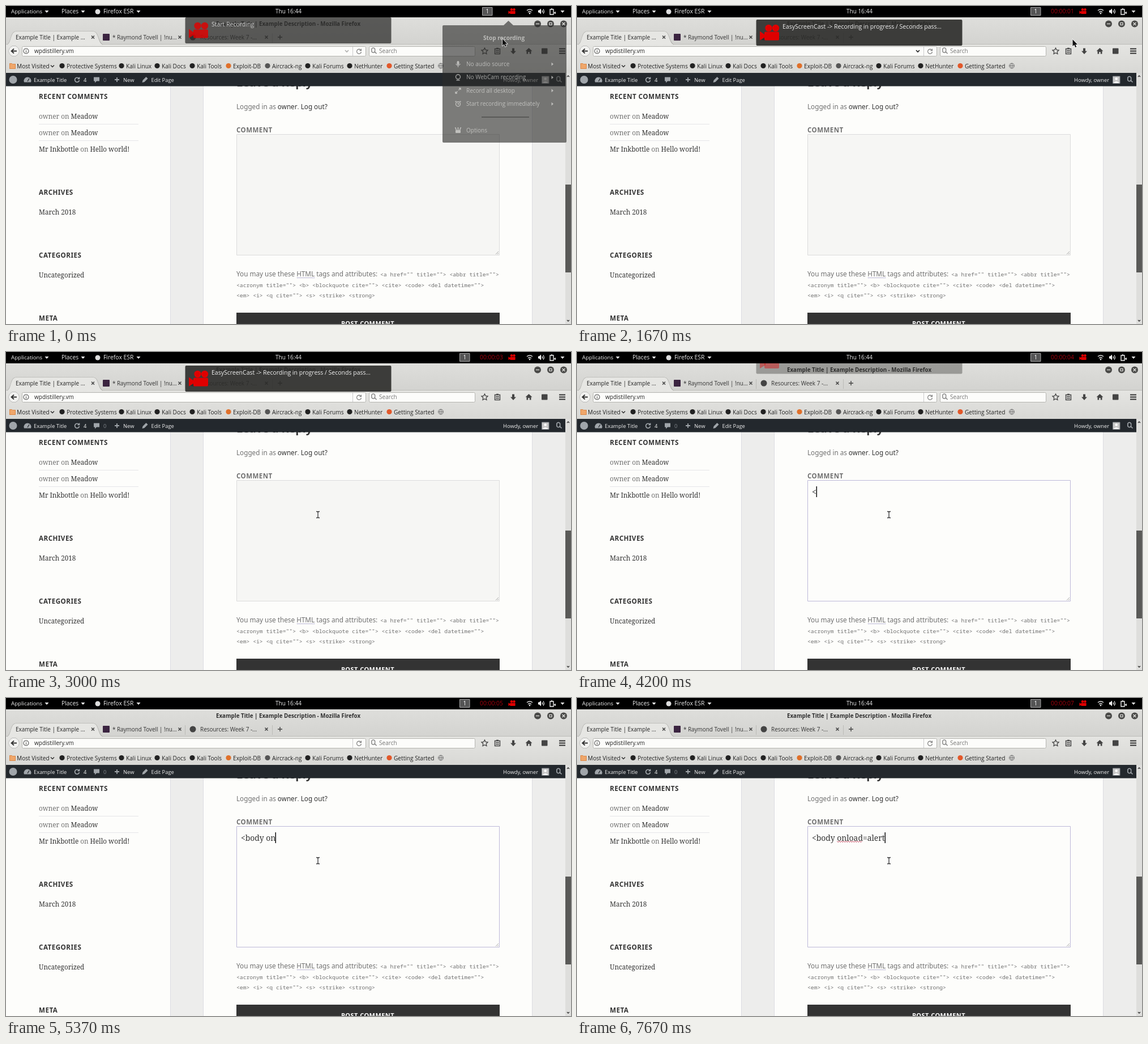
Recreate the animation shown at these times as an HTML page with a canvas. Size 998x561 px, loop 8000 ms.

```html
<!DOCTYPE html>
<html lang="en">
<head>
<meta charset="utf-8">
<title>Screen recording</title>
<style>
html, body { margin: 0; width: 100%; height: 100%; overflow: hidden; background: #000; }
canvas { display: block; }
</style>
</head>
<body>
<canvas id="stage" width="998" height="561"></canvas>
<script>
const ctx = document.getElementById('stage').getContext('2d');
const LOOP = 8000;
const UI = '"Open Sans", sans-serif', SANS = '"Noto Sans", sans-serif';
const SERIF = '"Noto Serif", serif', MONO = '"Noto Sans Mono", monospace';
const INK = '#333', GREY = '#707070', PAGE = '#fdfdfb', RED = '#e00000';
const clamp = v => Math.max(0, Math.min(1, v));

// ---- drawing helpers ----
function text(s, x, y, size, color, family = UI, weight = 400, spacing = 0) {
  ctx.font = `${weight} ${size}px ${family}`;
  ctx.letterSpacing = spacing + 'px';
  ctx.fillStyle = color;
  ctx.fillText(s, x, y);
  return x + ctx.measureText(s).width;
}
function runs(x, y, size, family, ...parts) {
  for (const [s, color] of parts) x = text(s, x, y, size, color, family);
}
function rect(x, y, w, h, fill, r = 0, stroke) {
  ctx.beginPath();
  ctx.roundRect(x, y, w, h, r);
  ctx.fillStyle = fill;
  ctx.fill();
  if (stroke) { ctx.strokeStyle = stroke; ctx.lineWidth = 1; ctx.stroke(); }
}
function disc(x, y, r, fill) {
  ctx.beginPath();
  ctx.arc(x, y, r, 0, 7);
  ctx.fillStyle = fill;
  ctx.fill();
}
function path(d, x, y, { fill, stroke, width = 1.2, scale = 1 }) {
  const p = new Path2D(d);
  ctx.save();
  ctx.translate(x, y);
  ctx.scale(scale, scale);
  if (stroke) { ctx.strokeStyle = stroke; ctx.lineWidth = width; ctx.stroke(p); }
  if (fill) { ctx.fillStyle = fill; ctx.fill(p); }
  ctx.restore();
}
const line = (d, x, y, stroke, width) => path(d, x, y, { stroke, width });
const solid = (d, x, y, fill) => path(d, x, y, { fill });
const gradient = (y0, y1, a, b) => {
  const g = ctx.createLinearGradient(0, y0, 0, y1);
  g.addColorStop(0, a);
  g.addColorStop(1, b);
  return g;
};

// ---- icon paths, centred on 0,0 ----
const DOWN = 'M-3.5-2H3.5L0 2Z', RIGHT = 'M-1.5-3L2 0L-1.5 3Z', CROSS = 'M-2.5-2.5L2.5 2.5M2.5-2.5L-2.5 2.5';
const RELOAD = 'M3-2.5A4 4 0 1 0 4 1M4-4.5V-1.5H1', PLUS = 'M-4 0H4M0-4V4', CHEVRON = 'M-3-1.5L0 1.5L3-1.5';
const LENS = 'M1.5-1.5A3 3 0 1 0-4-1.5A3 3 0 1 0 1.5-1.5M1 1L4.5 4.5';
const CAMERA = 'M-9-7a6 6 0 1 0 .1 0ZM8-2a6 6 0 1 0 .1 0Z';

function camera(x, y, scale) {
  ctx.save();
  ctx.translate(x, y);
  ctx.scale(scale, scale);
  disc(-1.5, -7.5, 6.2, RED);
  disc(11, -7.5, 6.2, RED);
  rect(-9, -1, 26, 15, RED, 2);
  solid('M-17-2L-7 5V8L-17 14Z', 0, 0, RED);
  ctx.restore();
}

// ---- desktop and browser ----
function topBar(t) {
  const count = Math.floor(t / 1000);
  rect(0, 0, 998, 20, '#000');
  text('Applications', 9, 13, 9.7, '#eee');
  text('Places', 98, 13, 10.3, '#eee');
  text('Firefox ESR', 172, 13, 10.4, '#eee');
  text('Thu 16:44', 476, 13, 10, '#eee');
  for (const x of [72, 136, 234]) solid(DOWN, x, 10, '#eee');
  disc(162, 10, 4.5, '#ddd');
  const box = count ? 801.5 : 841.5;
  rect(box, 2.5, 17.5, 14, '#555', 0, '#aaa');
  text('1', box + 6, 13, 10, '#fff');
  if (count) text('00:00:0' + count, 837, 13, 10.3, '#a8000c');
  camera(893.5, 9, .36);
  line('M-5-2Q0-6 5-2M-3 1Q0-2 3 1', 925, 10, '#ddd', 1.4);
  disc(925, 13, 1.4, '#ddd');
  solid('M-6-2H-4L-1-5V5L-4 2H-6Z', 946, 9.5, '#fff');
  line('M1-2Q2 0 1 2M3-4Q5.5 0 3 4', 946, 9.5, '#fff');
  line('M-4-4H2V5H-4ZM-2-5H0M3 2H6M5 0V4', 965, 10, '#eee', 1.4);
  solid(DOWN, 983, 10, '#eee');
}

const bookmarks = [
  ['Most Visited', 19], ['Protective Systems', 107, '#222'], ['Kali Linux', 212, '#222'],
  ['Kali Docs', 275, '#222'], ['Kali Tools', 337, '#222'], ['Exploit-DB', 401, '#e0702a'],
  ['Aircrack-ng', 470, '#555'], ['Kali Forums', 541, '#222'], ['NetHunter', 615, '#222'],
  ['Getting Started', 685, '#e2582a']
];

function browser(t) {
  rect(0, 20, 998, 48, gradient(20, 68, '#dededb', '#d3d3d0'));
  rect(0, 67, 998, 51, gradient(67, 118, '#e5e5e2', '#d8d8d5'));
  text('Example Title | Example Description - Mozilla Firefox', 371, 35, 9.75, '#2e2e2e', UI, 700);
  for (const [x, d] of [[939, 'M-3 0H3'], [962, 'M-2-2H2V2H-2Z'], [985, CROSS]]) {
    disc(x, 31.5, 6, '#4b4b49');
    line(d, x, 31.5, '#e5e5e2', 1.2);
  }

  // Tabs
  line('M0 67.5H998', 0, 0, '#bcbcb8', 1);
  path('M2 68C10 66 7 45 18 45H154C164 45 162 66 171 68', 0, 0, { fill: '#e6e6e3', stroke: '#aaaaa6' });
  line('M316.5 48V65M470.5 48V65', 0, 0, '#bbbbb7', 1);
  text('Example Title | Example ...', 17, 58.5, 9.95, '#222');
  rect(171, 49, 12, 12, '#3b2440', 1);
  text('* Raymond Tovell | !nu...', 188, 58.5, 9.9, '#333');
  disc(330, 55, 5.5, '#444');
  text('Resources: Week 7 -...', 343, 58.5, 9.95, '#333');
  for (const x of [153.5, 307, 460]) line(CROSS, x, 55, '#444', 1.5);
  line(PLUS, 484, 55, '#444', 1.4);

  // Address and search
  rect(28.5, 71.5, 607, 17, '#fcfcfa', 2, '#b4b4b0');
  rect(641.5, 71.5, 187, 17, '#fcfcfa', 2, '#b4b4b0');
  path('M9 0A9 9 0 1 0-9 0A9 9 0 1 0 9 0', 14, 79.5, { fill: '#f2f2f0', stroke: '#999', width: 1 });
  line('M5 0H-4M0-4L-4.5 0L0 4', 14, 79.5, '#333', 1.8);
  line('M4.5 0A4.5 4.5 0 1 0-4.5 0A4.5 4.5 0 1 0 4.5 0M0-2.5V-1.3M0-.5V2.7', 35.5, 79.5, '#555', 1.1);
  text('wpdistillery.vm', 50, 83, 10, '#222');
  ctx.globalAlpha = t < 1700 ? clamp(.35 + t / 250) : clamp(1 - (t - 1850) / 150);
  line(CHEVRON, 602, 79.5, '#222', 1.7);
  ctx.globalAlpha = 1;
  line('M612.5 72V88', 0, 0, '#ccc', 1);
  line(RELOAD, 623.5, 80, '#888', 1.3);
  line(LENS, 650, 79.5, '#777', 1.3);
  text('Search', 659, 83, 10.1, '#777');

  // Toolbar icons
  line('M0-5.5L1.7-2L5.5-1.5L2.7 1.2L3.4 5L0 3.2L-3.4 5L-2.7 1.2L-5.5-1.5L-1.7-2Z', 845.5, 79.5, '#444', 1.3);
  line('M-4.5-4H4.5V5H-4.5ZM-2-5H2M-3-1H3M-3 2H3', 868, 79.5, '#444', 1.4);
  solid('M-2-5H2V0H5L0 5.5L-5 0H-2Z', 896, 79.5, '#444');
  solid('M0-5.5L6 0H4V5H1.3V1.5H-1.3V5H-4V0H-6Z', 923.5, 79.5, '#444');
  rect(946, 74.5, 10.5, 10, '#444', 1);
  line('M-5.5-4H5.5M-5.5 0H5.5M-5.5 4H5.5', 982.5, 79.5, '#333', 1.8);

  // Bookmarks
  for (const [name, x, color] of bookmarks) {
    text(name, x, 109.5, 10.15, '#222');
    if (color) disc(x - 8, 105.5, 4.6, color);
  }
  path('M-5-4H-1L0-3H5V5H-5Z', 11.5, 105.5, { fill: '#efa66a', stroke: '#c86a25', width: 1 });
  line(CHEVRON, 82, 106, '#333', 1.5);
  line('M4.5 0A4.5 4.5 0 1 0-4.5 0A4.5 4.5 0 1 0 4.5 0M-4.5 0H4.5M0-4.5Q-4 0 0 4.5Q4 0 0-4.5', 768, 105.5, '#777', 1);
}

// ---- web page ----
function heading(s, y) { text(s, 58, y, 11.65, INK, SANS, 700, .46); }

function page() {
  rect(0, 118, 998, 443, '#ededec');
  rect(0, 118, 290, 443, PAGE);
  rect(348, 118, 581, 443, PAGE);
  line('M290.5 118V561M348.5 118V561M929.5 118V561', 0, 0, '#dcdce2', 1);

  heading('RECENT COMMENTS', 163.5);
  heading('ARCHIVES', 333);
  heading('CATEGORIES', 443.5);
  heading('META', 554.5);
  for (const y of [199, 228]) runs(58, y, 11.7, SERIF, ['owner on ', GREY], ['Meadow', INK]);
  runs(58, 257, 11.7, SERIF, ['Mr Inkbottle', INK], [' on ', GREY], ['Hello world!', INK]);
  line('M58 208.5H234M58 237.5H234', 0, 0, '#e6e6e8', 1);
  text('March 2018', 58, 368, 11.7, INK, SERIF);
  text('Uncategorized', 58, 478.5, 11.7, INK, SERIF);

  text('Leave a Reply', 407, 141.5, 19.7, INK, SANS, 700);
  runs(407, 182, 11.7, SANS, ['Logged in as ', GREY], ['owner', INK], ['. ', GREY], ['Log out?', INK]);
  text('COMMENT', 407, 222.5, 11.5, GREY, SANS, 700, .46);

  text('You may use these HTML tags and attributes:', 407, 477, 11.75, GREY, SANS);
  ctx.setLineDash([1, 1]);
  line('M514 479.5H546', 0, 0, '#7770b0', 1);
  ctx.setLineDash([]);
  text('<a href="" title=""> <abbr title="">', 661, 477, 9.73, GREY, MONO);
  text('<acronym title=""> <b> <blockquote cite=""> <cite> <code> <del datetime="">', 407, 495.5, 9.73, GREY, MONO);
  text('<em> <i> <q cite=""> <s> <strike> <strong>', 407, 514, 9.73, GREY, MONO);
  rect(407, 541, 465, 20, INK);
  text('POST COMMENT', 592, 563.5, 11, '#fff', SANS, 700, .44);

  // Site toolbar
  rect(0, 118, 988, 23.5, '#23282d');
  disc(12.5, 130, 7, '#a0a5aa');
  solid('M-6 4A6.5 6.5 0 1 1 6 4Z', 38, 130.5, '#a0a5aa');
  line('M0 3L3-2', 38, 130, '#23282d', 1.3);
  line(RELOAD, 125.5, 130, '#a0a5aa', 1.7);
  solid('M-5-5H5V2H0L-3 5V2H-5Z', 160, 130.5, '#a0a5aa');
  line(PLUS, 196, 130, '#a0a5aa', 1.8);
  solid('M-5 5L-4 1L2-5L5-2L-1 4Z', 245.5, 130, '#a0a5aa');
  text('Example Title', 49, 133.5, 9.4, '#eee');
  text('4', 137, 133.5, 9.4, '#eee');
  text('0', 172, 133.5, 9.4, '#82878c');
  text('New', 207, 133.5, 9.4, '#eee');
  text('Edit Page', 256.5, 133.5, 9.4, '#eee');
  text('Howdy, owner', 878, 133.5, 9.4, '#eee');
  rect(946.5, 124, 12.5, 12.5, '#c8c8c8', 0, '#82878c');
  disc(952.7, 128.5, 2.3, '#fff');
  solid('M-5 3Q0-3 5 3Z', 952.7, 133, '#fff');
  line(LENS, 977, 130, '#a0a5aa', 1.7);

  // Scrollbar
  rect(988, 118, 10, 443, '#dededc');
  rect(988, 315, 10, 155, '#5a5a58');
  line('M-2 1L0-1L2 1', 993, 124, '#333', 1.3);
  line('M-2-1L0 1L2-1', 993, 555, '#333', 1.3);
}

const typed = '<body onload=alert';
const keyTimes = [4170, 4430, 4700, 4830, 4970, 5070, 5230, 5370, 5530,
  5730, 6130, 6300, 6470, 7130, 7200, 7270, 7400, 7670];

function commentBox(t) {
  const focused = t >= 3930;
  rect(407.5, 226.5, 464, 213, focused ? PAGE : '#f6f6f4', 0, focused ? '#bdb9d8' : '#dcdcdc');
  line('M870 433L865 438M870 436L868 438', 0, 0, '#aaa', 1);
  if (!focused) return;
  const s = typed.slice(0, keyTimes.filter(k => t >= k).length);
  const end = text(s, 415, 252, 13.9, INK, SERIF);
  rect(Math.round(end) - .5, 237, 1.5, 19, '#111');
  if (t < 6470) return;
  const left = 415 + ctx.measureText('<body ').width;
  const right = 415 + ctx.measureText('<body onload').width;
  ctx.beginPath();
  for (let x = left, i = 0; x <= right; x += 2, i++) ctx.lineTo(x, 252.5 + i % 2 * 2);
  ctx.strokeStyle = '#c33a55';
  ctx.lineWidth = 1;
  ctx.stroke();
}

// ---- overlays ----
function notification(t) {
  const out = clamp((t - 4165) / 135), leave = out * (2 - out);
  const enter = clamp(t / 180);
  const alpha = t < 4000 ? .82 + .18 * enter : clamp(1 - 1.3 * leave);
  if (!alpha) return;
  ctx.save();
  ctx.beginPath();
  ctx.rect(0, 20, 998, 541);
  ctx.clip();
  ctx.translate(0, 20 + 4 * enter - 70 * leave);
  ctx.globalAlpha = alpha;
  rect(316.5, 0, 364, 46, 'rgba(44,44,42,.9)', 2);
  camera(340, 22.5, 1);
  text(t < 1000 ? 'Start Recording' : 'EasyScreenCast -> Recording in progress / Seconds pass...',
    363, 16, 10.5, '#eee');
  ctx.restore();
}

function menu(t) {
  const alpha = .64 * (1 - t / 200);
  if (alpha <= 0) return;
  const ink = '#e8e8e4';
  ctx.save();
  ctx.globalAlpha = alpha;
  solid('M773 34H879L887.5 26L896 34H988Q990 34 990 36V239Q990 241 988 241H773Q771 241 771 239V36Q771 34 773 34Z', 0, 0, 'rgba(45,45,43,.97)');
  text('Stop recording', 843, 59.5, 10.1, ink, UI, 700);
  ['No audio source', 'No WebCam recording', 'Record all desktop', 'Start recording immediately'].forEach((s, i) => {
    const y = 102.5 + i * 23.4;
    text(s, 813, y + 3.5, 10, ink);
    solid(RIGHT, 965, y, ink);
  });
  rect(796.5, 97, 4, 7, ink, 2);
  line('M-4 0Q0 6 4 0M0 3V6', 798.5, 102, ink, 1.2);
  line('M4 0A4 4 0 1 0-4 0A4 4 0 1 0 4 0M-3 6H3', 798.5, 125, ink, 1.4);
  line('M1-1L4.5-4.5M1.5-4.5H4.5V-1.5M-1 1L-4.5 4.5M-4.5 1.5V4.5H-1.5', 798.5, 149.5, ink, 1.4);
  line('M4 0A4 4 0 1 0-4 0A4 4 0 1 0 4 0M0-2V0H2M-5-4L-3-5M5-4L3-5', 798.5, 173, ink, 1.4);
  line('M840 196H924', 0, 0, '#111', 1);
  rect(794, 219, 9, 5, ink, 1);
  line('M-3 0L-5-5M0 0V-5M3 0L5-5', 798.5, 219, ink, 1.6);
  text('Options', 813, 223, 10, ink);
  ctx.restore();
}

const route = [[0, 877, 58], [1640, 877, 58], [2270, 652, 224], [2540, 652, 224],
  [2570, 647, 229], [3000, 551, 287], [LOOP, 551, 287]];

function pointer(t) {
  const i = route.findIndex(p => p[0] > t);
  const [t0, x0, y0] = route[i - 1], [t1, x1, y1] = route[i];
  const k = (t - t0) / (t1 - t0), e = k * k * (3 - 2 * k);
  const x = x0 + (x1 - x0) * e, y = y0 + (y1 - y0) * e;
  if (y > 200) {
    const beam = 'M-3-5.5H-1L0-4.5L1-5.5H3M0-4.5V4.5M-3 5.5H-1L0 4.5L1 5.5H3';
    line(beam, x, y, '#fff', 2.8);
    line(beam, x, y, '#333', 1.3);
  } else {
    path('M0 0V12L2.8 9.5L4.8 13.8L6.8 12.8L4.9 8.8H8.5Z', x, y, { fill: '#111', stroke: '#fff', width: 1.4 });
  }
}

function frame(now) {
  const t = now % LOOP;
  page();
  commentBox(t);
  browser(t);
  topBar(t);
  notification(t);
  menu(t);
  pointer(t);
}
let start;
function tick(now) {
  start ??= now;
  frame(now - start);
  requestAnimationFrame(tick);
}
requestAnimationFrame(tick);
</script>
</body>
</html>
```
